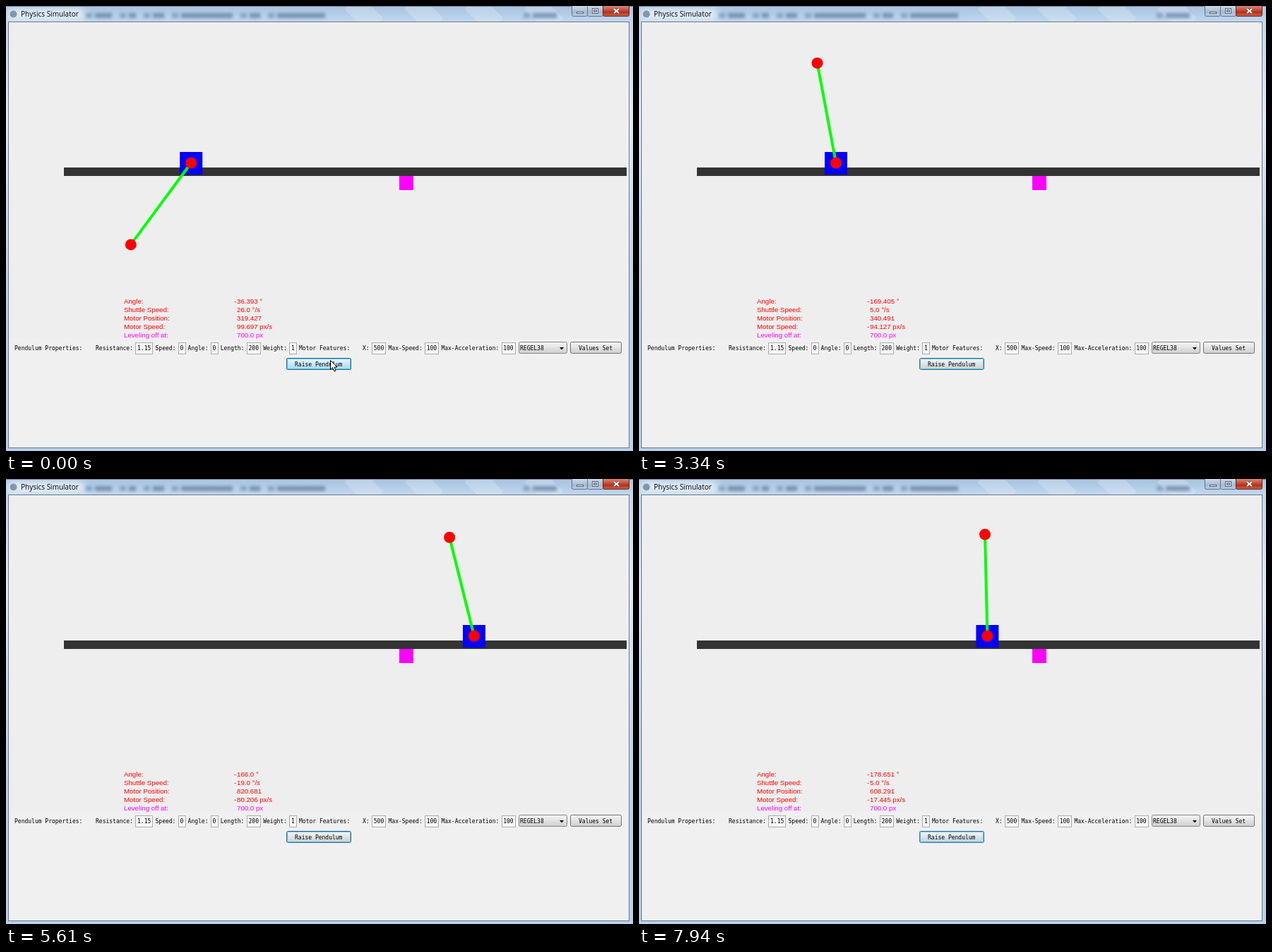
Animation, 888 px wide and 631 px high, one loop 8 s. Source, as an HTML page with a canvas:

```html
<!DOCTYPE html>
<html lang="en">
<head>
<meta charset="utf-8">
<title>Physics Simulator</title>
<style>
  html, body { margin: 0; width: 888px; height: 631px; overflow: hidden; }
  canvas { display: block; }
</style>
</head>
<body>
<canvas id="stage" width="888" height="631"></canvas>
<script>
const W = 888, H = 631, LOOP = 8000;
const RATE = 7.77; // simulated seconds per real second
const TICK = 68;   // about one repaint, in ms
const SANS = '9.7px "Liberation Sans", Arial, sans-serif';
const MONO = '8px "DejaVu Sans Mono", monospace';
const RED = '#ff0000', MAGENTA = '#ff00ff', GREY = ['#f3f3f3', '#ebebeb', '#dadada', '#cfcfcf'];

// turning points: time, motor position and speed, angle and its speed
const POSES = [
  [0, 319.427, 99.697, -36.393, 26],
  [885, 1007, 99.7, 124, 14],
  [1050, 1053.357, -27.891, 134.388, -7],
  [1400, 843, 0, 78, -25],
  [2224, 1038, 32, -80, -22],
  [2390, 995.462, -100.614, -101.541, -18],
  [3150, 437, -95, -172, 0],
  [3610, 100, -95, -150.5, 8],
  [3610, 100, 95, -150.5, 30], // bounce at the end of the rail
  [4350, 637.5, 99.994, 77.5, 25],
  [4600, 745, 0, 120, 15],
  [5200, 718, 60, 159, 19],
  [5610, 820.681, -80.206, 194, -19],
  [6030, 733, -15, 170, 0],
  [6530, 647.219, 12.555, 172.037, 6],
  [7250, 628, -3, 180.5, 0],
  [7940, 608.291, -17.445, 181.349, -5]
];

const stage = document.getElementById('stage').getContext('2d');
const back = document.createElement('canvas');
back.width = W;
back.height = H;

const ramp = (t, a, b) => Math.min(1, Math.max(0, (t - a) / (b - a)));

// cubic through two places with given speeds; returns [place, speed]
function glide(p0, v0, p1, v1, h, u) {
  const s0 = v0 * RATE, s1 = v1 * RATE, d = (p1 - p0) / h;
  const c2 = 3 * d - 2 * s0 - s1, c3 = s0 + s1 - 2 * d;
  return [p0 + h * u * (s0 + u * (c2 + u * c3)), (s0 + u * (2 * c2 + 3 * u * c3)) / RATE];
}

function stateAt(t) {
  let i = POSES.length - 2;
  while (POSES[i][0] > t) i--;
  const a = POSES[i], b = POSES[i + 1], span = b[0] - a[0];
  const n = Math.round(span / TICK);
  const u = Math.floor(ramp(t, a[0], b[0]) * n + 1e-6) / n;
  const track = c => glide(a[c], a[c + 1], b[c], b[c + 1], span / 1000, u);
  return { motor: track(1), swing: track(3), time: a[0] + span * u };
}

function rect(g, x, y, w, h, fill, stroke) {
  g.fillStyle = fill;
  g.fillRect(x, y, w, h);
  if (stroke) {
    g.strokeStyle = stroke;
    g.lineWidth = 1;
    g.strokeRect(x + .5, y + .5, w - 1, h - 1);
  }
}

function text(g, s, x, y, font = MONO, color = '#000') {
  g.font = font;
  g.fillStyle = color;
  g.fillText(s, x, y);
}

function disc(g, x, y, r, color) {
  g.fillStyle = color;
  g.beginPath();
  g.arc(x, y, r, 0, 7);
  g.fill();
}

function line(g, x0, y0, x1, y1, width, color) {
  g.strokeStyle = color;
  g.lineWidth = width;
  g.beginPath();
  g.moveTo(x0, y0);
  g.lineTo(x1, y1);
  g.stroke();
}

function shade(g, y0, y1, colors) {
  const f = g.createLinearGradient(0, y0, 0, y1);
  colors.forEach((c, i) => f.addColorStop(i / (colors.length - 1), c));
  return f;
}

function button(g, x, y, w, h, colors, stroke) {
  g.beginPath();
  g.roundRect(x + .5, y + .5, w - 1, h - 1, 2);
  g.fillStyle = shade(g, y, y + h, colors);
  g.fill();
  g.strokeStyle = stroke;
  g.lineWidth = 1;
  g.stroke();
}

// blurred icon and label pairs seen through the glass
function blurredItems(g, x, widths) {
  for (const w of widths) {
    rect(g, x, 10, 9, 7, 'rgba(90,120,155,.5)');
    rect(g, x + 13, 10, w, 7, 'rgba(60,88,125,.5)');
    x += w + 24;
  }
}

function drawTitleBar(g) {
  rect(g, 0, 0, W, H, shade(g, 0, H, ['#bdd3ea', '#dfebf8', '#c4d8ed', '#b9d1ea', '#b9d1ea']));
  rect(g, 0, 0, W, 23, shade(g, 0, 23, ['#a9c4df', '#b4cde7', '#c3d8ee']));
  for (let x = 490; x < 760; x += 85) line(g, x, -6, x + 34, 28, 30, 'rgba(235,244,255,.25)');
  g.filter = 'blur(6px)';
  rect(g, 2, 4, 108, 15, 'rgba(245,250,255,.8)');
  g.filter = 'blur(2px)';
  blurredItems(g, 113, [24, 10, 16, 73, 15, 68]);
  blurredItems(g, 733, [34]);
  g.filter = 'none';
  rect(g, 0, 0, W, 1, '#6d8198');
  disc(g, 10.5, 11.5, 5, '#8496ab');
  text(g, 'Physics Simulator', 21, 14.5, '10px "Open Sans", "Noto Sans", sans-serif');

  const glass = ['#dbe6f2', '#bccfe3', '#a2bad3', '#bfd3e8'];
  button(g, 801, -3, 23, 18, glass, '#5d728a');
  button(g, 823, -3, 23, 18, glass, '#5d728a');
  button(g, 845, -3, 38, 18, ['#e3a091', '#cf6a56', '#b5301b', '#d4694a'], '#5a2a27');
  rect(g, 808, 8, 10, 3, '#fff', '#53606e');
  rect(g, 830, 3, 9, 8, '#fff', '#53606e');
  rect(g, 832, 5, 5, 4, '#a9bfd6', '#53606e');
  for (const [color, width] of [['#5d3c3c', 3.6], ['#fff', 2]]) {
    line(g, 861, 4, 868, 10, width, color);
    line(g, 868, 4, 861, 10, width, color);
  }
}

// labels, each followed by its input box
function drawFields(g, x, fields) {
  for (const [label, value] of Object.entries(fields)) {
    text(g, label, x, 488);
    x += label.length * 4.8 + 3.5;
    const w = value.length * 4.8 + 5.7;
    rect(g, Math.round(x), 477, Math.round(w), 17, '#f6f6f7', '#abadb3');
    text(g, value, x + 2.7, 488);
    x += w + 3.3;
  }
}

function drawControls(g) {
  text(g, 'Pendulum Properties:', 12, 488);
  drawFields(g, 127, { 'Resistance:': '1.15', 'Speed:': '0', 'Angle:': '0', 'Length:': '200', 'Weight:': '1' });
  text(g, 'Motor Features:', 415, 488);
  drawFields(g, 505, { 'X:': '500', 'Max-Speed:': '100', 'Max-Acceleration:': '100' });
  button(g, 726, 476, 69, 17, GREY, '#858585');
  text(g, 'REGEL38', 728, 488);
  g.beginPath();
  g.moveTo(784, 484);
  g.lineTo(790, 484);
  g.lineTo(787, 487.5);
  g.fill();
  button(g, 799, 476, 73, 17, GREY, '#707070');
  text(g, 'Values Set', 811, 488);
}

// one line of the read-out; the last one is magenta
function drawRow(g, s, x, i) {
  text(g, s, x, 422 + 12 * i, SANS, i < 4 ? RED : MAGENTA);
}

function drawBack(g) {
  drawTitleBar(g);
  rect(g, 3, 22, 880, 605, '#f0f0f0', '#66798e');
  rect(g, 5, 24, 874, 448, '#eeeeee');
  rect(g, 82, 229, 797, 12, '#333333');
  rect(g, 557, 241, 20, 20, MAGENTA);
  ['Angle:', 'Shuttle Speed:', 'Motor Position:', 'Motor Speed:', 'Leveling off at:']
    .forEach((s, i) => drawRow(g, s, 167, i));
  drawControls(g);
}

function drawPendulum(g, x, angle) {
  const a = angle * Math.PI / 180, y = 222.5;
  const bx = x + 144 * Math.sin(a), by = y + 144 * Math.cos(a);
  g.save();
  g.beginPath();
  g.rect(5, 24, 874, 448);
  g.clip();
  rect(g, x - 16, 207, 32, 32, '#0000ff');
  line(g, x, y, bx, by, 4, '#00ff00');
  disc(g, x, y, 8, RED);
  disc(g, bx, by, 8, RED);
  g.restore();
}

function decimal(v, digits = 3) {
  const n = +v.toFixed(digits);
  return Number.isInteger(n) ? n.toFixed(1) : String(n);
}

function drawValues(g, values) {
  values.forEach((s, i) => {
    if (s[0] === '-') drawRow(g, '-', 323, i);
    drawRow(g, s.replace('-', ''), 327, i);
  });
}

function drawRaiseButton(g, t) {
  const hover = t < 2500;
  button(g, 397, 499, 92, 17, GREY, '#2f678f');
  g.globalAlpha = hover ? 1 : .35 + .35 * Math.cos((t - 4500) * Math.PI / 1000);
  button(g, 397, 499, 92, 17, ['#e8f5fc', '#d6eefb', '#b9e2f8', '#a6d8f2'], '#2f678f');
  g.globalAlpha = 1;
  g.strokeStyle = '#62c4e6';
  g.strokeRect(398.5, 500.5, 89, 14);
  text(g, 'Raise Pendulum', 409, 510.5);
}

function drawCursor(g, t) {
  const nudge = ramp(t, 500, 600), leave = ramp(t, 2440, 3150);
  g.save();
  g.translate(459.5 + 4 * nudge + 317 * leave, 502.5 - 2 * nudge + 140 * leave);
  g.beginPath();
  for (const [x, y] of [[0, 0], [0, 13], [3, 10], [5.5, 15.5], [7.5, 14.5], [5.5, 9.5], [9.5, 9.5]]) g.lineTo(x, y);
  g.closePath();
  g.fillStyle = '#fff';
  g.fill();
  g.strokeStyle = '#000';
  g.lineWidth = 1;
  g.stroke();
  g.restore();
}

function draw(now) {
  const { motor: [place, speed], swing: [angle, spin], time } = stateAt(now % LOOP);
  const wrapped = ((angle + 180) % 360 + 360) % 360 - 180;
  stage.drawImage(back, 0, 0);
  drawPendulum(stage, .8 * Math.floor(place) + 7, angle);
  drawValues(stage, [decimal(wrapped) + ' °', decimal(spin, 0) + ' °/s', decimal(place),
    decimal(speed) + ' px/s', '700.0 px']);
  drawRaiseButton(stage, time);
  drawCursor(stage, time);
  requestAnimationFrame(() => draw(performance.now() - start));
}

drawBack(back.getContext('2d'));
const start = performance.now();
draw(0);
</script>
</body>
</html>
```
